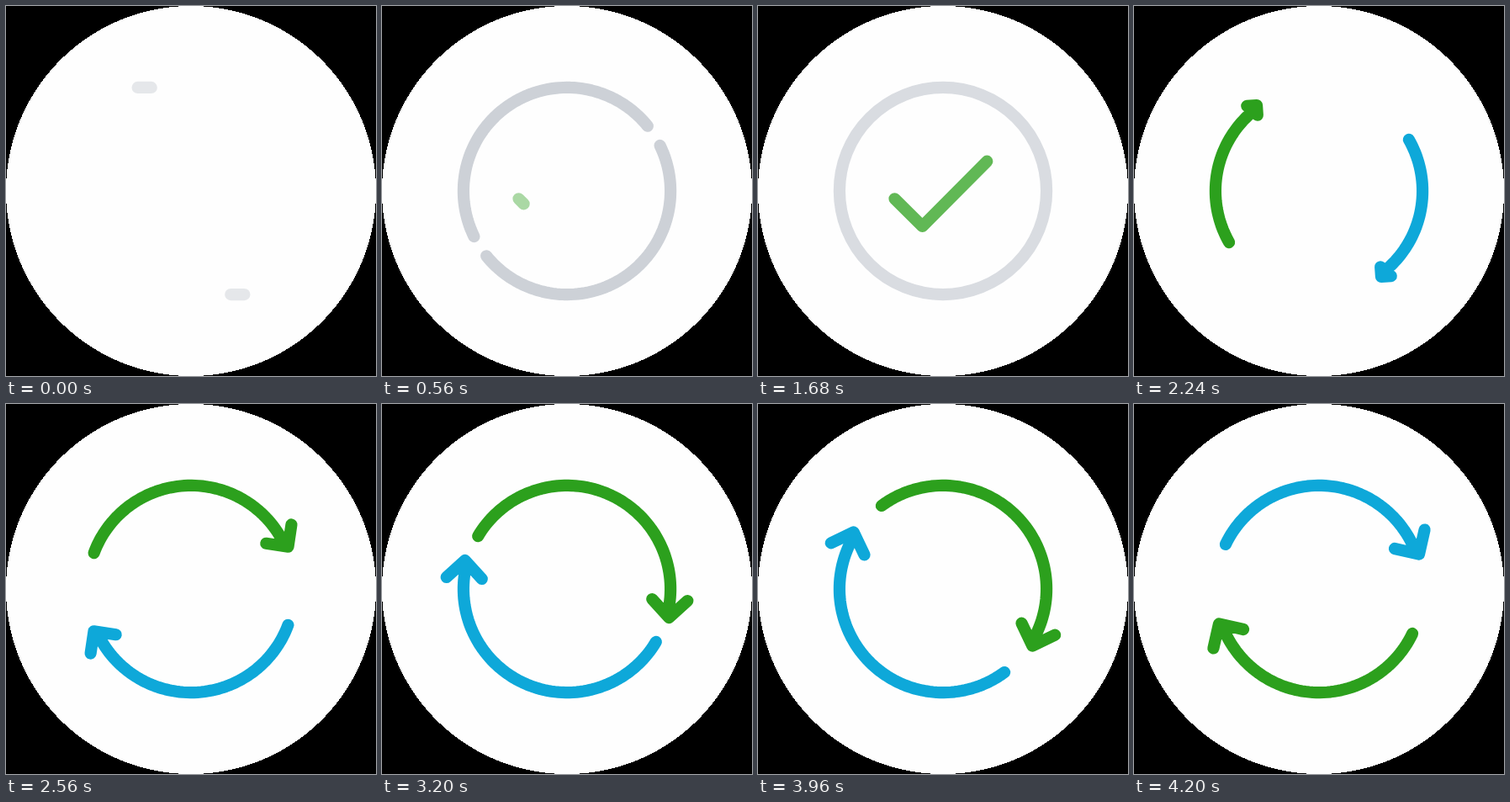
An HTML page with a canvas for the animation above (4.24 s loop, 440 by 440 pixels).

```html
<!DOCTYPE html>
<html lang="en">
<head>
<meta charset="utf-8">
<title>Sync loop</title>
<style>
  html, body { margin: 0; width: 100%; height: 100%; overflow: hidden; background: #000; }
  canvas { display: block; width: 440px; height: 440px; }
</style>
</head>
<body>
<canvas id="stage" width="440" height="440"></canvas>
<script>
const ctx = document.getElementById('stage').getContext('2d');
const LOOP = 4240, STEP = 40, HALF = 220, R = 123.1, RAD = Math.PI / 180;
const GREY = '#cdd1d7', GREEN = '#2ca01d', BLUE = '#0ea8d9';
const TICK = [[-57.5, 9.3], [-24.5, 42], [52.3, -35.3]];

const ramp = (t, from, to) => Math.min(1, Math.max(0, (t - from) / (to - from)));
const easeOut = (p, power) => 1 - (1 - p) ** power;
const smooth = p => p * p * (3 - 2 * p);
const mix = (a, b, p) => a + (b - a) * p;

// Positions along the track are degrees past the top of the ring.
function ringSpan(t) {
  const p = ramp(t, 0, 1240);
  return [mix(-29.5, 160, easeOut(p, 1.13)), mix(-22, 340, easeOut(p, 2))];
}

// Fast spin that slows down, a small swing back, then the next spin.
function arrowSpan(t) {
  const p = ramp(t, 1760, 3120);
  const swing = -16.7 * smooth(ramp(t, 3200, 3640));
  const next = ramp(t, 3760, 4200) ** 2;
  return [
    mix(-29.5, 300.7, easeOut(p, 3.9)) + swing + 191.5 * next,
    mix(-22, 465.7, easeOut(p, 2.84)) + swing + 161.8 * next
  ];
}

// The track is a straight lead-in that runs into the ring at its top.
function track(s) {
  const a = s * RAD;
  return s < 0 ? [a * R, -R] : [Math.sin(a) * R, -Math.cos(a) * R];
}

function trail(from, to) {
  ctx.moveTo(...track(from));
  for (let s = from + 2; s < to; s += 2) ctx.lineTo(...track(s));
  ctx.lineTo(...track(to));
}

function barbs(s, size) {
  const a = s * RAD, r = R + 2.9;
  const x = Math.sin(a) * r, y = -Math.cos(a) * r;
  const back = a + (180 - 13) * RAD;
  const end = turn => [x + Math.cos(back + turn) * size, y + Math.sin(back + turn) * size];
  ctx.moveTo(...end(-Math.PI / 4));
  ctx.lineTo(x, y);
  ctx.lineTo(...end(Math.PI / 4));
}

function tick(progress) {
  const legs = TICK.slice(1).map(([x, y], i) => Math.hypot(x - TICK[i][0], y - TICK[i][1]));
  let left = progress * (legs[0] + legs[1]);
  ctx.moveTo(...TICK[0]);
  legs.forEach((leg, i) => {
    if (left <= 0) return;
    const u = Math.min(1, left / leg);
    ctx.lineTo(mix(TICK[i][0], TICK[i + 1][0], u), mix(TICK[i][1], TICK[i + 1][1], u));
    left -= leg;
  });
}

function stroke(color, alpha, turn, build) {
  ctx.save();
  ctx.translate(HALF, HALF);
  ctx.rotate(turn);
  ctx.globalAlpha = alpha;
  ctx.strokeStyle = color;
  ctx.beginPath();
  build();
  ctx.stroke();
  ctx.restore();
}

// Filled row by row to keep a hard edge.
function disc() {
  ctx.fillStyle = '#fefefe';
  for (let y = 0; y < 2 * HALF; y++) {
    const w = Math.round(Math.sqrt(HALF ** 2 - (y + .5 - HALF) ** 2));
    ctx.fillRect(HALF - w, y, 2 * w, 1);
  }
}

function draw(t) {
  ctx.clearRect(0, 0, 2 * HALF, 2 * HALF);
  disc();
  ctx.lineWidth = 14.2;
  ctx.lineCap = ctx.lineJoin = 'round';

  const fade = 1 - ramp(t, 1600, 1920);
  if (fade > 0) {
    stroke(GREY, ramp(t, -80, 80) * fade, 0, () => {
      if (t >= 1240) return ctx.arc(0, 0, R, 0, 2 * Math.PI);
      trail(...ringSpan(t));
      ctx.rotate(Math.PI);
      trail(...ringSpan(t));
    });
    if (t > 480) {
      stroke(GREEN, ramp(t, 480, 680) * fade, 0, () => tick(smooth(ramp(t, 480, 1040))));
    }
  }

  if (t > 1760) {
    const [from, to] = arrowSpan(t);
    const size = 29.8 * easeOut(ramp(t, 2080, 2800), 2);
    [GREEN, BLUE].forEach((color, i) => stroke(color, ramp(t, 1760, 1920), i * Math.PI, () => {
      trail(from, to - 1.5);
      if (size > 0) barbs(to, size);
    }));
  }
}

const start = performance.now();
function frame() {
  const t = (performance.now() - start) % LOOP;
  draw(Math.floor(t / STEP) * STEP);
  requestAnimationFrame(frame);
}
frame();
</script>
</body>
</html>
```
